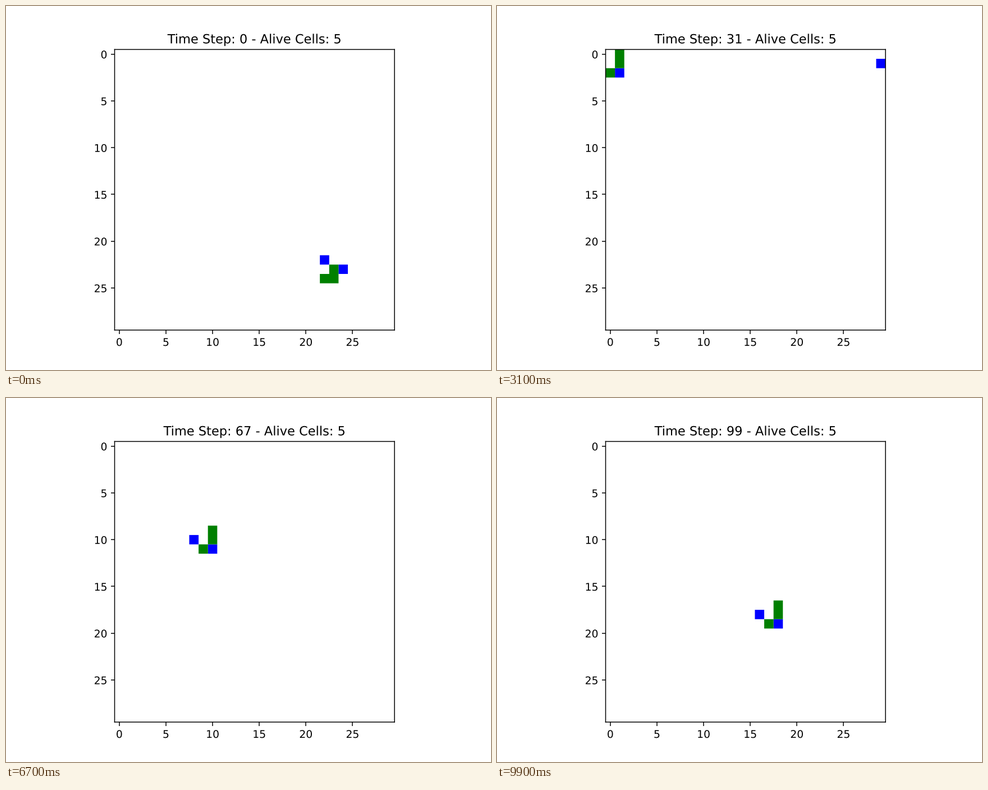
Animation of 864x648 px, one loop 10000 ms. Source, as a matplotlib script:

```python
import matplotlib.pyplot as plt
import numpy as np
from matplotlib.animation import FuncAnimation
from matplotlib.patches import PathPatch
from matplotlib.patheffects import Normal
from matplotlib.path import Path

SIZE = 30
STEPS = 100
DEAD, NEWBORN, SURVIVOR = range(3)
COLORS = {NEWBORN: "blue", SURVIVOR: "green"}

# Keep edges at their exact sub-pixel places.
plt.rcParams["path.snap"] = False


def evolve(cells):
    """One Game of Life step on a torus, telling births from survivors."""
    alive = cells != DEAD
    near = sum(
        np.roll(alive.astype(int), (dy, dx), axis=(0, 1))
        for dy in (-1, 0, 1)
        for dx in (-1, 0, 1)
        if dy or dx
    )
    after = np.full_like(cells, DEAD)
    after[~alive & (near == 3)] = NEWBORN
    after[alive & ((near == 2) | (near == 3))] = SURVIVOR
    return after


def run():
    cells = np.zeros((SIZE, SIZE), dtype=int)
    glider = np.array([[0, 0, 1], [1, 0, 1], [0, 1, 1]])
    cells[22:25, 21:24] = glider * NEWBORN
    history = []
    for _ in range(STEPS):
        cells = evolve(cells)
        history.append(cells)
    return history


def squares(mask):
    """One path holding a unit square around every marked cell."""
    unit = Path.unit_rectangle()
    return Path.make_compound_path(
        *(Path(unit.vertices + (col - 0.5, row - 0.5), unit.codes)
          for row, col in np.argwhere(mask))
    )


history = run()

fig = plt.figure(figsize=(6.4, 4.8), dpi=135)
ax = fig.add_axes([215 / 960, 79 / 720, 554 / 960, 555 / 720])
ax.set(
    xlim=(-0.5, SIZE - 0.5),
    ylim=(SIZE - 0.5, -0.5),
    xticks=range(0, SIZE, 5),
    yticks=range(0, SIZE, 5),
)
title = ax.set_title("", pad=5.8)

patches = {
    state: ax.add_patch(PathPatch(squares(history[0] == state), color=color, lw=0))
    for state, color in COLORS.items()
}

# Draw text as outlines so that it is not rounded to whole pixels.
for text in [title, *ax.get_xticklabels(), *ax.get_yticklabels()]:
    text.set_path_effects([Normal()])


def update(step):
    cells = history[step]
    for state, patch in patches.items():
        patch.set_path(squares(cells == state))
    title.set_text(f"Time Step: {step} - Alive Cells: {np.count_nonzero(cells)}")
    return [*patches.values(), title]


anim = FuncAnimation(fig, update, frames=STEPS, interval=100, repeat=True, repeat_delay=0)
plt.show()
```
